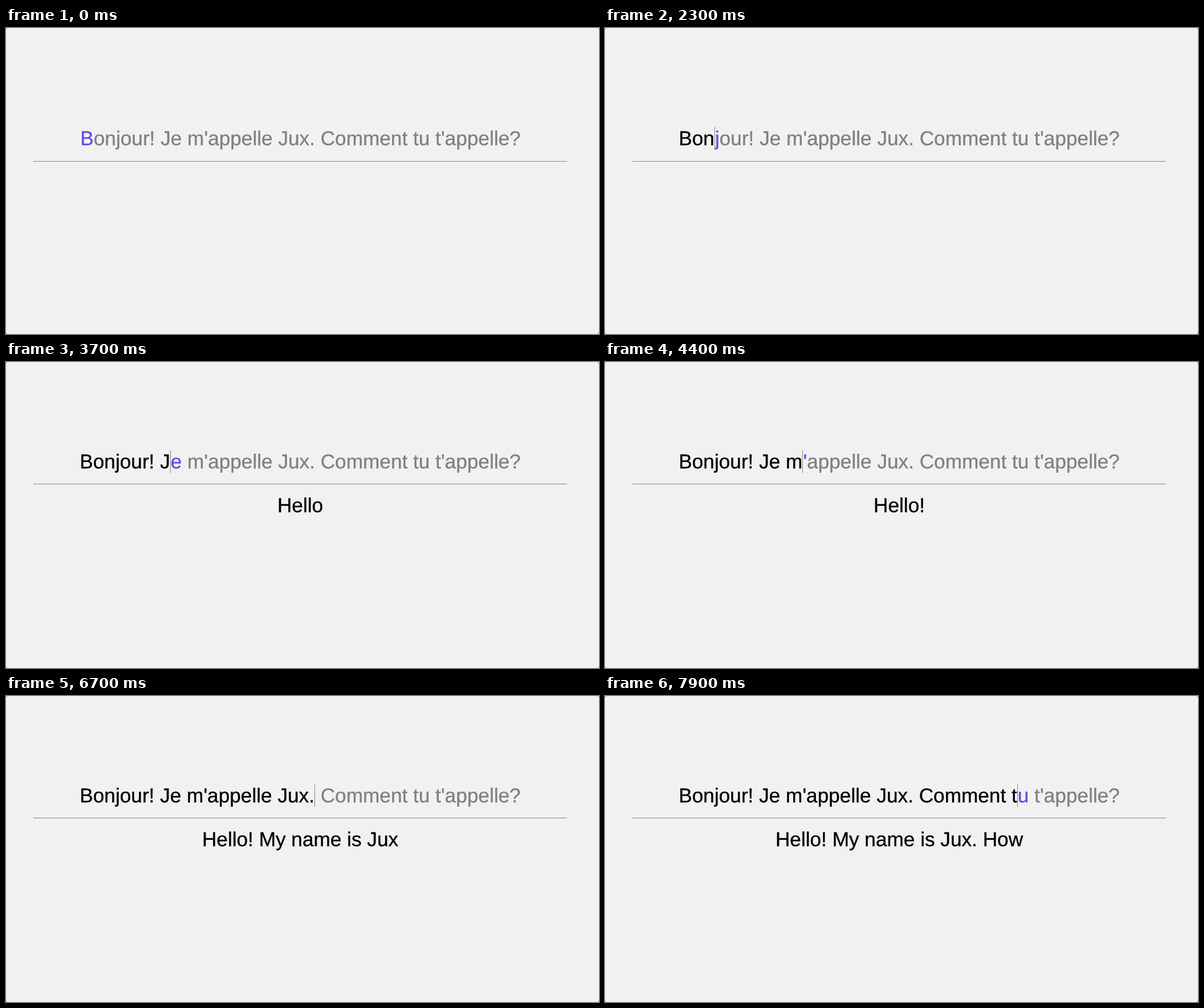
Recreate the animation shown at these times as an HTML page. Size 1040x538 px, loop 8000 ms.

```html
<!DOCTYPE html>
<html lang="fr">
<head>
<meta charset="utf-8">
<title>Typing lesson</title>
<style>
  html, body {
    margin: 0;
    width: 100%;
    height: 100%;
    overflow: hidden;
    background: #555;
  }
  #stage {
    position: relative;
    width: 1040px;
    height: 538px;
    border-radius: 3px;
    background: #f1f1f1;
    font: 35.2px/40px "Liberation Sans", Helvetica, Arial, sans-serif;
    font-kerning: none;
    text-rendering: geometricPrecision;
    -webkit-text-stroke: 0.35px currentColor;
    color: #000;
  }
  .line {
    position: absolute;
    left: 48px;
    width: 936px;
    text-align: center;
    white-space: pre;
  }
  #prompt { top: 175px; }
  #rule { top: 234px; height: 1px; background: #858585; }
  #answer { top: 233px; }
  .open #prompt { top: 156px; }
  .open #rule { top: 214px; }
  #rest { color: #808080; }
  #key { position: relative; margin-left: 1px; color: #654be3; }
  #key.caret::before {
    content: "";
    position: absolute;
    left: -1px;
    top: -1px;
    width: 1px;
    height: 40px;
    background: #858585;
  }
</style>
</head>
<body>
<div id="stage">
  <div id="prompt" class="line"><span id="typed"></span><span id="key"></span><span id="rest"></span></div>
  <div id="rule" class="line"></div>
  <div id="answer" class="line"></div>
</div>
<script>
  const LOOP = 8000;
  const CARET_ON = 500;
  const SENTENCE = "Bonjour! Je m'appelle Jux. Comment tu t'appelle?";

  // [time in ms, characters typed]; the typist speeds up
  const PACE = [[1500, 0.5], [3200, 7.5], [4400, 13.5], [5700, 20.5], [6700, 26.5], [7900, 36.5]];

  const ANSWERS = [
    [0, ""],
    [3500, "Hello"],
    [3800, "Hello!"],
    [4700, "Hello! I"],
    [6200, "Hello! My name is"],
    [6600, "Hello! My name is Jux"],
    [7000, "Hello! My name is Jux."],
    [7800, "Hello! My name is Jux. How"]
  ];

  const [stage, typed, key, rest, answer] =
    ["stage", "typed", "key", "rest", "answer"].map(id => document.getElementById(id));

  function typedCount(time) {
    const next = PACE.findIndex(([t]) => t > time);
    if (next === 0) return 0;
    if (next < 0) return Math.floor(PACE[PACE.length - 1][1]);
    const [t0, n0] = PACE[next - 1];
    const [t1, n1] = PACE[next];
    return Math.floor(n0 + (n1 - n0) * (time - t0) / (t1 - t0));
  }

  function setText(element, text) {
    if (element.textContent !== text) element.textContent = text;
  }

  function draw(now) {
    const time = now % LOOP;
    const count = typedCount(time);
    const reply = ANSWERS.filter(([t]) => t <= time).pop()[1];

    setText(typed, SENTENCE.slice(0, count));
    setText(key, SENTENCE[count]);
    setText(rest, SENTENCE.slice(count + 1));
    setText(answer, reply);
    key.classList.toggle("caret", time >= CARET_ON);
    stage.classList.toggle("open", reply !== "");
  }

  const start = performance.now();
  function tick() {
    draw(performance.now() - start);
    requestAnimationFrame(tick);
  }
  tick();
</script>
</body>
</html>
```
